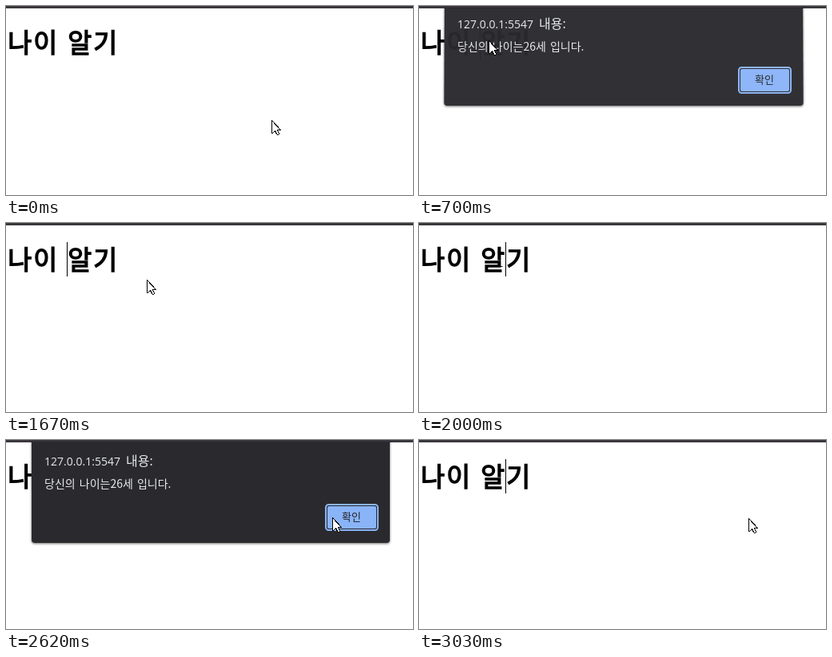
An HTML page that plays this animation: 509 px wide and 237 px high, repeating every 3190 ms.

```html
<!DOCTYPE html>
<html lang="ko">
<head>
<meta charset="utf-8">
<title>나이 알기</title>
<style>
  html, body { margin: 0; width: 100%; height: 100%; overflow: hidden; background: #fff; }
  svg { display: block; width: 100%; height: 100%; }
  text { font-family: "Noto Sans CJK KR", "Noto Sans CJK", sans-serif; }
  .host { font-family: "Open Sans", "Noto Sans CJK KR", sans-serif; }
  .heading { font-size: 32.6px; letter-spacing: 2px; stroke: #000; stroke-width: 1.4px; }
</style>
</head>
<body>
<svg viewBox="0 0 509 237">
  <defs>
    <filter id="shadow" x="-5%" y="-10%" width="110%" height="125%">
      <feDropShadow dx="0" dy="1" stdDeviation="1.6" flood-color="#000" flood-opacity=".6"/>
    </filter>
    <clipPath id="page"><rect y="2" width="509" height="235"/></clipPath>
  </defs>

  <rect width="509" height="3" fill="#3a373c"/>
  <text class="heading" x="2.3" y="58">나이 알기</text>
  <rect id="caret" y="24" width="1" height="43"/>

  <g clip-path="url(#page)">
    <g id="dialog">
      <path id="panel" fill="#292a2d" filter="url(#shadow)"/>
      <text class="host" x="48" y="31.5" font-size="14" fill="#e8eaed">127.0.0.1:5547<tspan x="150" font-size="16">내용:</tspan></text>
      <text x="48" y="60" font-size="14" word-spacing="1.2" fill="#e8eaed">당신의 나이는26세 입니다.</text>
      <rect x="400" y="81" width="65" height="32" rx="3.5" fill="#292a2d" stroke="#8ab4f8" stroke-width="2"/>
      <rect id="button" x="402" y="83" width="61" height="28" rx="2"/>
      <text x="432" y="100.8" font-size="13" text-anchor="middle" fill="#202124">확인</text>
    </g>
  </g>

  <path id="arrow" d="M.5 .5V16.5H1.5L4.5 13.5L6.5 17.5L8 18.5L9.5 17.5L7.5 12.5H11.5Z" fill="#fff" stroke="#000" shape-rendering="crispEdges"/>
  <path id="beam" d="M-3 -9H-1L0 -8L1 -9H3M0 -8V8M-3 9H-1L0 8L1 9H3" fill="none" stroke="#000"/>
</svg>
<script>
const LOOP = 3190, LAST = 3030, STEP = 68;
const STARTS = [0, 490, 1040, 1600, 2140, 2690];
const SHOWS = [{ open: 490, close: 1430 }, { open: 2004, close: 2750 }];
const OPEN_MS = 272, CLOSE_MS = 200, PRESS_MS = 120;

// time, x, y; equal neighbours mean the pointer rests
const POINTER = [
  [0, 332, 143],
  [340, 87, 43],
  [730, 87, 43],
  [1270, 422, 97],
  [1430, 422, 97],
  [1668, 176, 71],
  [1790, 101, 45],
  [2000, 101, 45],
  [2140, 232, 85],
  [2500, 408, 97],
  [2720, 408, 97],
  [2850, 412, 98]
];

const byId = id => document.getElementById(id);
const [caret, dialog, panel, button, arrow, beam] =
  ["caret", "dialog", "panel", "button", "arrow", "beam"].map(byId);
const clamp = u => Math.max(0, Math.min(1, u));
const show = (el, on) => el.setAttribute("visibility", on ? "visible" : "hidden");

function snap(t) {
  const start = STARTS.filter(s => s <= t).pop();
  return Math.min(LAST, start + Math.floor((t - start) / STEP) * STEP);
}

// Speed along one axis at a key: zero at rests and at both ends.
function speed(i, axis) {
  const before = POINTER[i - 1], key = POINTER[i], after = POINTER[i + 1];
  if (!before || !after || before[1] === key[1] || after[1] === key[1]) return 0;
  return (after[axis] - before[axis]) / (after[0] - before[0]);
}

// Smooth Hermite curve through the keys.
function pointerAt(t) {
  const i = POINTER.findIndex(k => k[0] > t);
  if (i < 0) return POINTER[POINTER.length - 1].slice(1);
  const a = POINTER[i - 1], b = POINTER[i];
  const span = b[0] - a[0], u = (t - a[0]) / span;
  const mix = u * u * (3 - 2 * u);
  return [1, 2].map(axis => Math.round(
    a[axis] + (b[axis] - a[axis]) * mix
    + span * u * (1 - u) * (speed(i - 1, axis) * (1 - u) - speed(i, axis) * u)
  ));
}

function dialogAt(t) {
  const now = SHOWS.find(s => t > s.open && t < s.close + CLOSE_MS);
  if (!now) return null;
  const gap = 1 - clamp((t - now.open) / OPEN_MS);
  const out = clamp((t - now.close) / CLOSE_MS);
  return {
    alpha: (1 - gap ** 2.4) * (1 - out) ** 1.5,
    dy: -16 * gap - 8 * out,
    flare: 2.5 * gap + out,
    pressed: t >= now.close - PRESS_MS
  };
}

// The lower edge tilts outward while the window opens or closes.
function panelPath(flare) {
  const l = 32 - flare, r = 480 + flare;
  return `M32 -20H480L${r} 125Q${r} 129 ${r - 4} 129H${l + 4}Q${l} 129 ${l} 125Z`;
}

function draw(time) {
  const t = snap(time);
  const box = dialogAt(t);
  show(dialog, box);
  if (box) {
    dialog.setAttribute("opacity", box.alpha);
    dialog.setAttribute("transform", `translate(0 ${box.dy})`);
    panel.setAttribute("d", panelPath(box.flare));
    button.setAttribute("fill", box.pressed ? "#83aaeb" : "#8ab4f8");
  }

  show(caret, t >= 490);
  caret.setAttribute("x", t < 1940 ? 76 : 108);

  const [x, y] = pointerAt(t);
  const overText = !box && x < 140 && y > 24 && y < 67;
  show(arrow, !overText);
  show(beam, overText);
  arrow.setAttribute("transform", `translate(${x} ${y})`);
  beam.setAttribute("transform", `translate(${x + 0.5} ${y + 0.5})`);
}

const begin = performance.now();
function tick() {
  draw((performance.now() - begin) % LOOP);
  requestAnimationFrame(tick);
}
tick();
</script>
</body>
</html>
```
